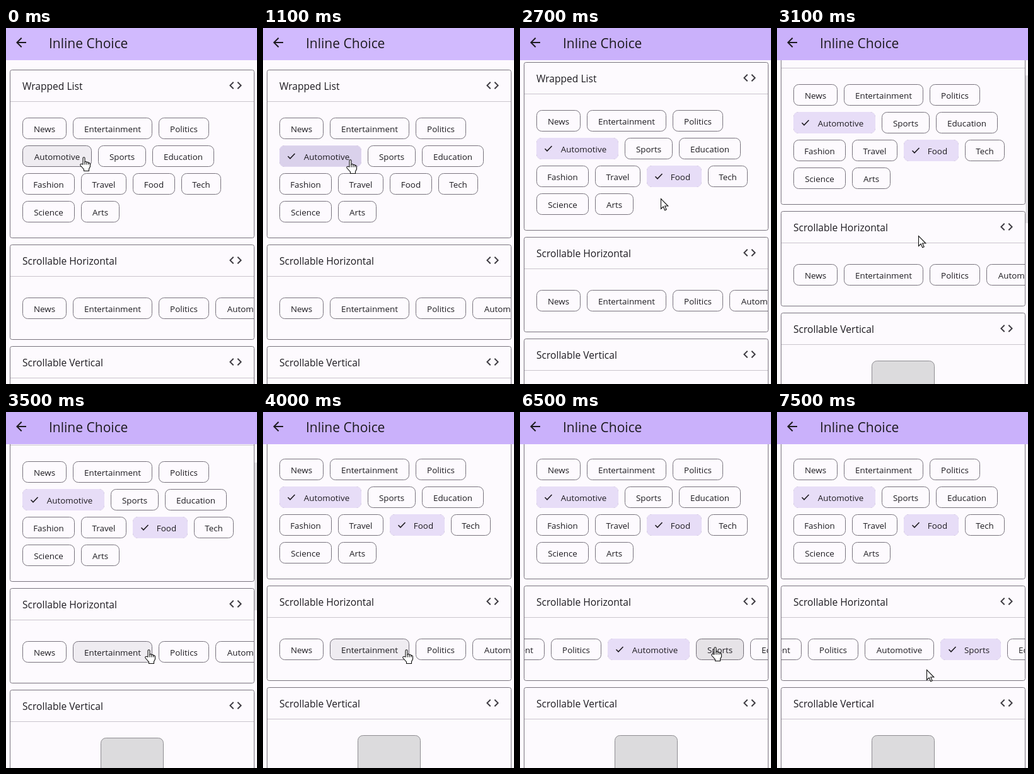
An HTML page with a canvas that plays this animation: 398x564 px, repeating every 8 s.

```html
<!DOCTYPE html>
<html lang="en">
<head>
<meta charset="utf-8">
<title>Inline Choice</title>
<style>
  html, body { margin: 0; width: 100%; height: 100%; overflow: hidden; background: #fdfafe; }
  canvas { display: block; width: 398px; height: 564px; }
</style>
</head>
<body>
<canvas id="stage"></canvas>
<script>
const W = 398, H = 564, LOOP = 8000, BAR = 51;
const INK = '#1d1b20', LINE = '#79747e', PAPER = '#fdfafe', PICKED = '#e7ddf7';
const FONT = '"Open Sans", "Noto Sans", sans-serif';

const canvas = document.getElementById('stage');
const dpr = window.devicePixelRatio || 1;
canvas.width = W * dpr;
canvas.height = H * dpr;
const ctx = canvas.getContext('2d');

const backIcon = new Path2D('M20 11H7.83l5.59-5.59L12 4l-8 8 8 8 1.41-1.41L7.83 13H20z');
const codeIcon = new Path2D('M9.4 16.6L4.8 12l4.6-4.6L8 6l-6 6 6 6zM14.6 16.6l4.6-4.6-4.6-4.6L16 6l6 6-6 6z');
const handShape = new Path2D('M5 12V2.2C5 .2 8 .2 8 2.2V8C9 7 11 7.4 11 9C12 8 14 8.6 14 10C15 9.2 16.5 10 16.5 11.5V15.5L14.5 19.5V22.5H6.5V20L1 13.8C0 12 2 10.6 3.4 11.6Z');
const arrowShape = new Path2D('M.5 .5V16.5L4.2 13L6.7 18.8L9.2 17.7L6.7 12H11.8Z');

const chipWidth = {
  News: 70, Entertainment: 126, Politics: 80, Automotive: 110, Sports: 76, Education: 98,
  Fashion: 83, Travel: 72, Food: 67, Tech: 63, Science: 83, Arts: 61
};
const topics = Object.keys(chipWidth);
const rows = [topics.slice(0, 3), topics.slice(3, 6), topics.slice(6, 10), topics.slice(10)];

// Tracks: [time, value...]
const pointerTrack = [
  [0, 122, 205], [750, 122, 205], [1000, 137, 209], [1250, 137, 209], [1600, 231, 242],
  [2250, 231, 242], [2550, 223, 270], [2750, 223, 270], [3400, 224, 376], [3600, 226, 377],
  [5950, 226, 377], [6400, 308, 373], [7200, 306, 376], [7450, 237, 408]
];
const pageTrack = [[2500, 0], [2700, 12], [3150, 58], [3500, 64], [3600, 68]];
const listTrack = [[4550, 0], [4800, 60], [5100, 157], [5350, 193]];
const clicks = [850, 1700, 5800, 6550];

const clamp = v => Math.min(1, Math.max(0, v));
const ramp = (t, start, span) => clamp((t - start) / span);
const smooth = v => v * v * (3 - 2 * v);

function sample(track, t, ease = v => v) {
  if (t <= track[0][0]) return track[0].slice(1);
  for (let i = 1; i < track.length; i++) {
    const a = track[i - 1], b = track[i];
    if (t < b[0]) {
      const k = ease(ramp(t, a[0], b[0] - a[0]));
      return a.slice(1).map((v, n) => v + (b[n + 1] - v) * k);
    }
  }
  return track[track.length - 1].slice(1);
}

function text(str, x, y, size, weight) {
  ctx.font = `${weight} ${size}px ${FONT}`;
  ctx.fillStyle = INK;
  ctx.fillText(str, x, y);
}

function icon(path, x, y, color) {
  ctx.save();
  ctx.translate(x, y);
  ctx.fillStyle = color;
  ctx.fill(path);
  ctx.restore();
}

function box(x, y, w, h, r, fill, stroke) {
  ctx.beginPath();
  ctx.roundRect(x + 0.5, y + 0.5, w - 1, h - 1, r);
  if (fill) { ctx.fillStyle = fill; ctx.fill(); }
  if (stroke) { ctx.lineWidth = 1; ctx.strokeStyle = stroke; ctx.stroke(); }
}

function card(title, y, h) {
  box(6, y, 388, h, 3, null, LINE);
  ctx.fillStyle = '#cac5cd';
  ctx.fillRect(7, y + 50, 386, 1);
  text(title, 26, y + 32, 15.6, 500);
  icon(codeIcon, 352, y + 13, '#3f3c43');
}

// Draws one chip and returns its width.
function chip(label, x, y, picked, scene) {
  const w = chipWidth[label] + 20 * picked;
  const { px, py, pressed } = scene;
  const hover = px >= x && px < x + w && py >= y && py < y + 34 && py > BAR;
  box(x, y, w, 34, 8, null, LINE);
  if (picked) {
    ctx.globalAlpha = picked;
    ctx.beginPath();
    ctx.roundRect(x, y, w, 34, 8);
    ctx.fillStyle = PICKED;
    ctx.fill();
    ctx.globalAlpha = 1;
  }
  if (hover) {
    scene.hand = true;
    box(x, y, w, 34, 8, `rgba(29,27,32,${pressed ? 0.1 : 0.06})`);
  }
  if (picked) {
    ctx.globalAlpha = picked;
    ctx.beginPath();
    ctx.moveTo(x + 13.5, y + 17.3);
    ctx.lineTo(x + 17, y + 20.8);
    ctx.lineTo(x + 24.5, y + 13);
    ctx.lineWidth = 1.6;
    ctx.strokeStyle = INK;
    ctx.stroke();
    ctx.globalAlpha = 1;
  }
  ctx.textAlign = 'center';
  text(label, x + chipWidth[label] / 2 + 20 * picked, y + 23, 13.4, 500);
  ctx.textAlign = 'left';
  return w;
}

function chipRow(labels, x, y, picks, scene) {
  for (const label of labels) x += chip(label, x, y, picks[label] || 0, scene) + 10;
}

function pointer({ px, py, hand }) {
  ctx.save();
  ctx.translate(Math.round(px) - (hand ? 5 : 0), Math.round(py) - (hand ? 1 : 0));
  const shape = hand ? handShape : arrowShape;
  ctx.fillStyle = '#fff';
  ctx.fill(shape);
  ctx.lineWidth = 1.1;
  ctx.strokeStyle = '#111';
  ctx.stroke(shape);
  if (hand) {
    ctx.beginPath();
    for (const x of [8, 11, 14]) {
      ctx.moveTo(x, x === 8 ? 8 : 9.5);
      ctx.lineTo(x, 12.5);
    }
    ctx.stroke();
  }
  ctx.restore();
}

function draw(t) {
  const [px, py] = sample(pointerTrack, t, smooth);
  const scroll = Math.round(sample(pageTrack, t)[0]);
  const slide = Math.round(sample(listTrack, t)[0]);
  const pick = at => smooth(ramp(t, at, 200));
  const scene = { px, py, hand: false, pressed: clicks.some(c => t > c - 100 && t < c + 200) };

  ctx.setTransform(dpr, 0, 0, dpr, 0, 0);
  ctx.fillStyle = PAPER;
  ctx.fillRect(0, 0, W, H);

  card('Wrapped List', 66 - scroll, 267);
  const wrapped = { Automotive: pick(clicks[0]), Food: pick(clicks[1]) };
  rows.forEach((row, i) => chipRow(row, 26, 142 + 44 * i - scroll, wrapped, scene));

  card('Scrollable Horizontal', 343 - scroll, 151);
  ctx.save();
  ctx.beginPath();
  ctx.rect(7, 394 - scroll, 386, 99);
  ctx.clip();
  const sports = pick(clicks[3]);
  const single = { Automotive: pick(clicks[2]) * (1 - sports), Sports: sports };
  chipRow(topics, 26 - slide, 427 - scroll, single, scene);
  ctx.restore();

  card('Scrollable Vertical', 504 - scroll, 400);
  box(150, 580 - scroll, 100, 300, 8, '#dcdbdd', '#8f8d92');

  const thumb = ramp(t, 2700, 300) * (1 - ramp(t, 3700, 300));
  if (thumb) {
    ctx.fillStyle = `rgba(29,27,32,${0.13 * thumb})`;
    ctx.fillRect(394, BAR + scroll * 0.456, 4, 234);
  }

  const tint = ramp(t, 2500, 200);
  const mix = (a, b) => Math.round(a + (b - a) * tint);
  ctx.fillStyle = `rgb(${mix(209, 202)},${mix(186, 177)},${mix(254, 251)})`;
  ctx.fillRect(0, 0, W, BAR);
  icon(backIcon, 12, 11, INK);
  text('Inline Choice', 68, 32, 21, 400);

  pointer(scene);
}

const begin = performance.now();
function tick() {
  draw((performance.now() - begin) % LOOP);
  requestAnimationFrame(tick);
}
tick();
</script>
</body>
</html>
```
